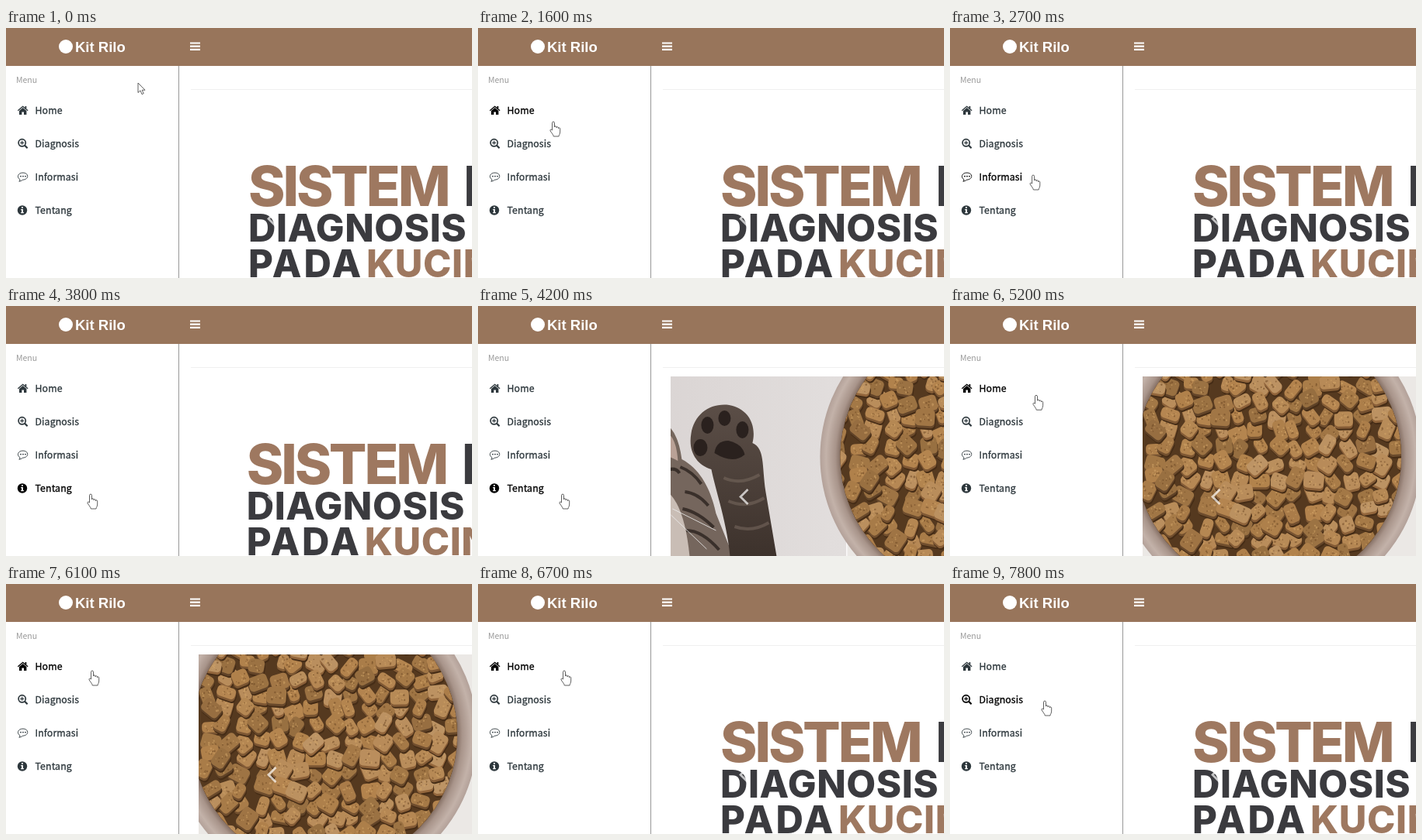
Animation of 600 by 323 pixels, one loop 8000 ms. Source, as an HTML page:

```html
<!DOCTYPE html>
<html lang="id">
<head>
<meta charset="utf-8">
<style>
  html, body { margin: 0; height: 100%; overflow: hidden; background: #fff; }
  svg { display: block; }
  .brand { font: bold 18.5px "Liberation Sans", Arial, sans-serif; fill: #fff; }
  .menu { font: 500 12.3px "Noto Sans CJK JP", "Noto Sans CJK SC", "Noto Sans CJK", "Open Sans", sans-serif; }
  .item { color: #2d373c; fill: currentColor; }
  .item.on { color: #000; }
  .item text { letter-spacing: .12px; stroke: currentColor; stroke-width: .3px; }
  .line { fill: none; stroke: currentColor; }
  .title { font: 800 49px Inter, sans-serif; letter-spacing: .6px; fill: #3b3b3f; }
  .title .big { font-size: 72px; letter-spacing: -3px; }
  .title .wide { letter-spacing: 3px; }
  .title .brown { fill: #9e7860; }
  .cursor { fill: #fff; stroke: #444; stroke-width: .85; stroke-linejoin: round; }
</style>
</head>
<body>
<svg width="600" height="323" viewBox="0 0 600 323">
  <defs>
    <clipPath id="view"><path d="M248 91H600V323H248z"/></clipPath>
    <clipPath id="bowl"><circle cx="410" cy="195" r="171"/></clipPath>
    <clipPath id="photo"><path d="M248 91H1447V323H248z"/></clipPath>
    <linearGradient id="wall">
      <stop offset="0" stop-color="#fff"/><stop offset=".5" stop-color="#d8d2d1"/><stop offset="1" stop-color="#e2dedd"/>
    </linearGradient>
    <linearGradient id="fur" x2="0" y2="1">
      <stop offset="0" stop-color="#5b4e47"/><stop offset="1" stop-color="#3d322c"/>
    </linearGradient>
    <radialGradient id="rim" gradientUnits="userSpaceOnUse" cx="410" cy="195" r="197">
      <stop offset=".86" stop-color="#7d675b"/><stop offset=".9" stop-color="#a8948a"/>
      <stop offset=".96" stop-color="#c3b2a9"/><stop offset="1" stop-color="#b3a199"/>
    </radialGradient>
  </defs>

  <path d="M238 79.5H600" stroke="#f0f0f0"/>

  <g clip-path="url(#view)">
    <g id="banner">
      <g class="title">
        <text class="big brown" x="312" y="230">SISTEM</text>
        <text class="big" x="589" y="230">PAKAR</text>
        <text x="312" y="275.5">DIAGNOSIS</text>
        <text class="wide" x="312" y="321.5">PADA</text>
        <text class="brown" x="464" y="321.5">KUCING</text>
      </g>
      <g clip-path="url(#photo)"><g transform="translate(971)">
        <path d="M-150 91H476V323H-150z" fill="url(#wall)"/>
        <path d="M140 323C135 270 150 235 170 215L178 160 215 190H232L248 156Q260 168 264 198C290 212 302 240 308 268L330 323z" fill="#75665d"/>
        <path d="M248 166Q257 174 259 200L244 193z" fill="#b9a196"/>
        <path d="M215 323Q222 260 248 242 268 262 274 323z" fill="#c9bdb5"/>
        <path d="M246 212q10-4 15 4M268 240q17 2 30 18M265 262q20 4 40 24M270 290q20 0 42 25M262 208q16 6 27 22" fill="none" stroke="#3a302b" stroke-width="4"/>
        <path d="M250 270L296 314M252 262L308 290" stroke="#eee" stroke-width=".8"/>
        <path d="M276 165C280 140 300 125 325 128 348 132 361 152 355 177 371 184 367 205 372 240L386 323H326C322 280 308 240 302 211 283 205 272 188 276 165z" fill="url(#fur)"/>
        <g fill="#2a211e">
          <ellipse cx="288" cy="183" rx="9" ry="11"/><ellipse cx="297" cy="154" rx="8" ry="11"/>
          <ellipse cx="319" cy="145" rx="8" ry="10"/><ellipse cx="342" cy="160" rx="8" ry="11"/>
          <path d="M306 190Q308 174 324 174 342 178 345 192 330 205 306 190z"/>
        </g>
        <path d="M318 222q22 10 46-4M324 252q24 10 46-4M332 285q22 8 44-5" fill="none" stroke="#75665c" stroke-width="4" opacity=".6"/>
      </g></g>
    </g>
    <g id="food">
      <path d="M248 91H1447V323H248z" fill="#ebe8e5"/>
      <circle cx="410" cy="195" r="197" fill="url(#rim)"/>
      <g clip-path="url(#bowl)">
        <path d="M230 20H600V370H230z" fill="#55391f"/>
        <g id="kibble"></g>
      </g>
    </g>
    <path d="M347.5 237L338 246.5 347.5 256" fill="none" stroke="#fff" stroke-width="2.8" opacity=".7"/>
  </g>

  <path d="M222.500 49V323" stroke="#999"/>
  <path d="M0 0H600V49H0z" fill="#98755b"/>
  <circle cx="77" cy="24" r="9" fill="#fff"/>
  <text class="brand" x="89" y="30.5">Kit Rilo</text>
  <path d="M237 19.500H250M237 23.700H250M237 27.900H250" stroke="#fff" stroke-width="2.200"/>

  <g class="menu">
    <text x="13" y="71" style="font-size:10.5px;font-weight:400" fill="#9a9a9a">Menu</text>
    <g class="item">
      <path d="M17 107L21.700 103 26.400 107V112H23V108.500H20.400V112H17zM24.500 101H26.300V104H24.500z"/>
      <path class="line" d="M15.300 106.800L21.700 101.300 28.100 106.800" stroke-width="1.400"/>
      <text x="37.500" y="111">Home</text>
    </g>
    <g class="item">
      <circle class="line" cx="20.700" cy="148.300" r="4.600" stroke-width="1.700"/>
      <path class="line" d="M18.200 148.300H23.200M20.700 145.800V150.800" stroke-width="1.200"/>
      <path class="line" d="M24.200 151.800L27.600 155.200" stroke-width="2.200"/>
      <text x="37.500" y="154">Diagnosis</text>
    </g>
    <g class="item">
      <path class="line" d="M18 195.700C13.500 193 15 187 22 187S30.500 195.500 21.500 196.200Q19.500 198 16.800 198.200 18.300 197 18 195.700z" stroke-width=".9"/>
      <circle cx="19" cy="191.600" r=".9"/><circle cx="22" cy="191.600" r=".9"/><circle cx="25" cy="191.600" r=".9"/>
      <text x="37.500" y="197">Informasi</text>
    </g>
    <g class="item">
      <circle cx="21" cy="235.500" r="6.200"/>
      <path d="M20 231H22V232.700H20zM19.200 234H22V238H22.900V239.300H19.200V238H20.100V235.300H19.200z" fill="#fff"/>
      <text x="37.500" y="240">Tentang</text>
    </g>
  </g>

  <path id="arrow" class="cursor" d="M0 0V12.500L3 9.800 5 14.600 7.200 13.600 5.200 9.200H9z"/>
  <path id="hand" class="cursor" d="M-1.500 11V1.600a1.500 1.500 0 0 1 3 0V7c0-1.600 2.600-1.600 2.600 0v.8c0-1.500 2.400-1.400 2.400.2v.8c0-1.400 2.200-1.200 2.200.3V13c0 3-1.500 4-1.700 6H.3C0 17-2 15-3.800 12c-1-1.800.8-2.600 2.300-1z"/>
</svg>
<script>
const $ = id => document.getElementById(id);
const items = document.querySelectorAll('.item');
const LOOP = 8000, SLIDE_START = 3782, SLIDE_TIME = 600, SLIDE_WIDTH = 1200, RELOAD = 6150;

// Pointer path: time, x, y of the fingertip
const path = [
  [100, 170, 71], [900, 97, 121], [2300, 97, 121], [2800, 108, 196], [3000, 108, 196],
  [3400, 109, 243], [4200, 109, 243], [4400, 110, 248], [5300, 111, 112], [7100, 111, 112], [7800, 122, 151]
];

let seed = 7;
const random = (min, max) => {
  seed = (seed * 16807) % 2147483647;
  return min + (max - min) * seed / 2147483647;
};

// Each piece is a lit, speckled top face over a darker side and a soft shadow.
function fillBowl() {
  const pieces = [];
  for (let y = 84; y < 335; y += 20) {
    for (let x = 236; x < 590; x += 23) {
      const w = random(19, 27), h = random(13, 22), light = random(42, 57);
      const cx = x + random(-6, 6), cy = y + random(-5, 5), turn = random(-75, 75);
      const face = (dx, dy, fill) => `<rect x="${-w / 2}" y="${-h / 2}" width="${w}" height="${h}" rx="5"
        transform="translate(${dx} ${dy}) rotate(${turn})" fill="${fill}"/>`;
      let dots = '';
      for (let i = 0; i < 12; i++) {
        const tone = i % 2 ? '#6f4a26' : '#d3a669';
        dots += `<circle cx="${random(-w / 3, w / 3)}" cy="${random(-h / 3, h / 3)}" r="${random(.6, 1.4)}" fill="${tone}"/>`;
      }
      pieces.push([random(0, 1), `<g transform="translate(${cx} ${cy})">
        ${face(1, 4, '#452c16')}${face(0, 2, `hsl(29 42% ${light - 16}%)`)}${face(0, -1, `hsl(32 40% ${light}%)`)}
        <g transform="translate(0 -1) rotate(${turn})" opacity=".55">${dots}</g></g>`]);
    }
  }
  $('kibble').innerHTML = pieces.sort((a, b) => a[0] - b[0]).map(p => p[1]).join('');
}

// cubic-bezier(.42, 0, .58, 1)
function easeInOut(x) {
  if (x <= 0 || x >= 1) return x <= 0 ? 0 : 1;
  let low = 0, high = 1, s;
  for (let i = 0; i < 20; i++) {
    s = (low + high) / 2;
    const bx = 1.26 * s * (1 - s) ** 2 + 1.74 * s * s * (1 - s) + s ** 3;
    if (bx < x) low = s; else high = s;
  }
  return s * s * (3 - 2 * s);
}

function pointerAt(t) {
  const next = path.findIndex(key => key[0] > t);
  if (next === 0) return path[0].slice(1);
  if (next < 0) return path[path.length - 1].slice(1);
  const [t0, x0, y0] = path[next - 1], [t1, x1, y1] = path[next];
  const k = easeInOut((t - t0) / (t1 - t0));
  return [x0 + (x1 - x0) * k, y0 + (y1 - y0) * k];
}

function move(id, x, y = 0) {
  $(id).setAttribute('transform', `translate(${x} ${y})`);
}

function draw() {
  const t = performance.now() % LOOP;
  const slide = t < RELOAD ? easeInOut((t - SLIDE_START) / SLIDE_TIME) : 0;
  move('banner', -SLIDE_WIDTH * slide);
  move('food', SLIDE_WIDTH * (1 - slide));

  const [x, y] = pointerAt(t);
  const row = Math.floor((y - 85) / 43);
  items.forEach((item, i) => item.classList.toggle('on', i === row));
  move('arrow', x, y);
  move('hand', x, y);
  $('arrow').style.display = row < 0 ? '' : 'none';
  $('hand').style.display = row < 0 ? 'none' : '';
  requestAnimationFrame(draw);
}

fillBowl();
draw();
</script>
</body>
</html>
```
